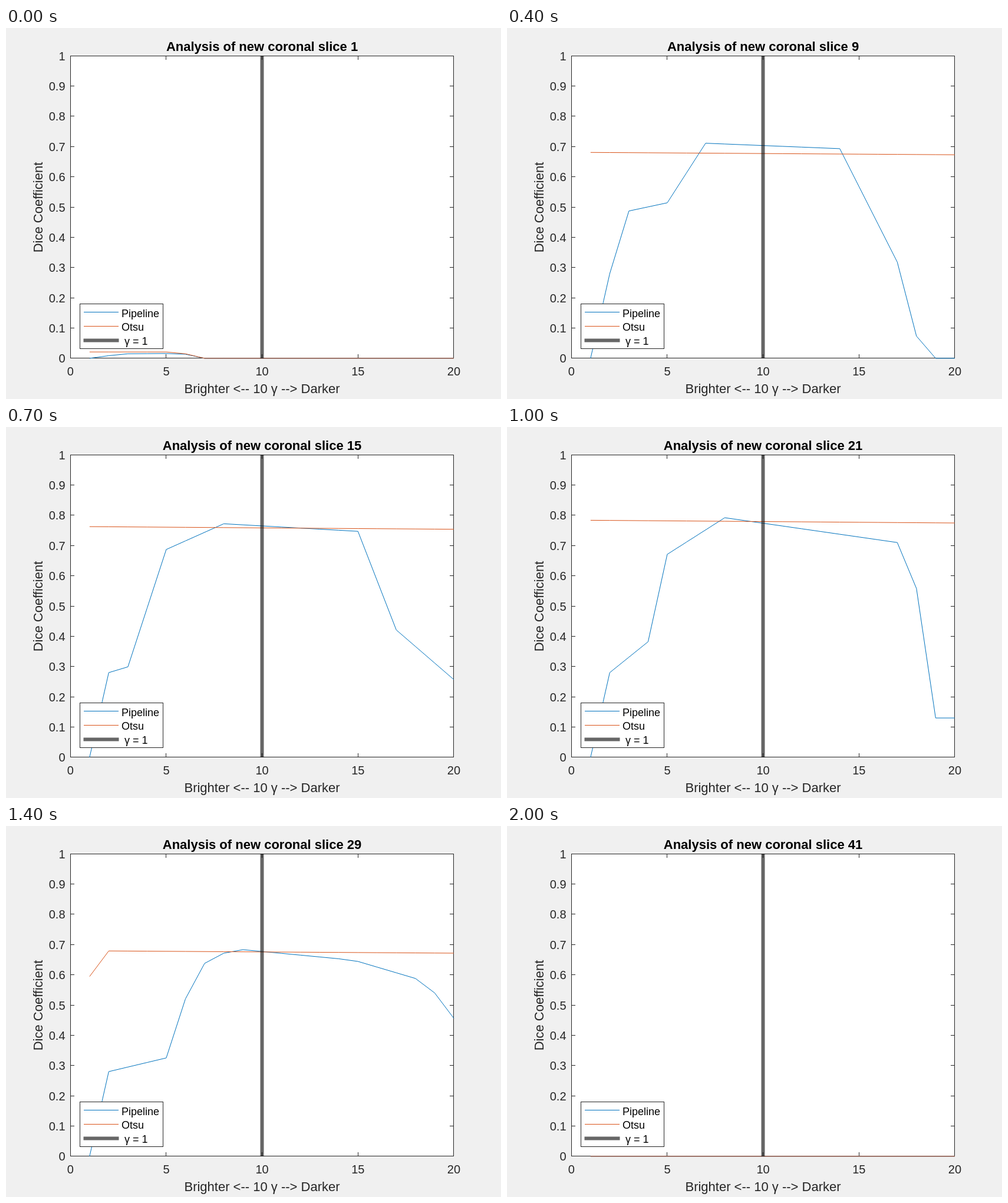
Animation, 840 px wide and 630 px high, one loop 2.05 s. Source, as an HTML page with a canvas:

```html
<!DOCTYPE html>
<html>
<head>
<meta charset="utf-8">
<style>
html, body { margin: 0; width: 100%; height: 100%; overflow: hidden; background: #f0f0f0; }
canvas { display: block; }
</style>
</head>
<body>
<canvas id="stage" width="840" height="630"></canvas>
<script>
const ctx = document.getElementById('stage').getContext('2d');
const STEP = 50, SLICES = 41;
const BLUE = '#0072bd', ORANGE = '#d95319', DARK = '#262626', GREY = '#666';
const FONT = '"Liberation Sans", Arial, sans-serif';
const px = v => 109.3 + v * 32.53;
const py = v => 560.9 - v * 513.7;
const pixel = v => Math.floor(v) + .5;
const mix = (a, b, u) => a + (b - a) * u;
const clamp = (v, lo, hi) => Math.min(hi, Math.max(lo, v));

// Otsu score by slice
const LEVELS = [[1, .021], [9, .681], [15, .763], [21, .784], [25, .758], [34, .49], [41, 0]];

// Pipeline turning points by slice: foot, knee, peak, shoulder, slope, tail
const SHAPES = [
  [9, [[3, .487], [5, .514], [7, .711], [14, .693], [17, .318], [18.3, 0]]],
  [15, [[3, .299], [5, .687], [8, .772], [15, .747], [17, .421], [20, .257]]],
  [21, [[4, .382], [5, .671], [8, .792], [17, .71], [18, .558], [19, .13]]],
  [25, [[4, .324], [5, .626], [8, .777], [17, .739], [19, .629], [20, .415]]],
  [34, [[7, .338], [8, .602], [9, .573], [12, .535], [18, .513], [20, .508]]]
];

// Smooth polynomial through the known levels
const level = slice => LEVELS.reduce((sum, [s, value]) =>
  sum + LEVELS.reduce((p, [t]) => t === s ? p : p * (slice - t) / (s - t), value), 0);

// The first slices lose their signal when darkened
const cutoff = (gamma, slice) => clamp((3 + 4 * slice - gamma) / 1.4, 0, 1);

function otsu(slice) {
  const top = level(slice), dip = Math.max(0, slice - 25) / 32;
  return g => top * (1 - .0006 * g) * (1 - dip * Math.max(0, 2 - g)) * cutoff(g, slice);
}

function pipeline(slice) {
  const s = clamp(slice, 9, 34);
  const i = Math.max(1, SHAPES.findIndex(([end]) => end >= s));
  const [from, start] = SHAPES[i - 1], [to, end] = SHAPES[i];
  const u = (s - from) / (to - from);
  const turns = start.map((p, j) => p.map((v, k) => mix(v, end[j][k], u)));
  const points = [[1, 0], [2, .28], ...turns];
  const scale = level(slice) / level(s);
  return g => along(points, g) * scale * cutoff(g, slice);
}

function along(points, x) {
  const i = points.findIndex(p => p[0] >= x);
  if (i < 0) return points[points.length - 1][1];
  if (i === 0) return points[0][1];
  const [x0, y0] = points[i - 1], [x1, y1] = points[i];
  return mix(y0, y1, (x - x0) / (x1 - x0));
}

function text(str, x, y, size, align = 'left', color = DARK, weight = '') {
  ctx.font = `${weight} ${size}px ${FONT}`;
  ctx.textAlign = align;
  ctx.fillStyle = color;
  ctx.fillText(str, x, y);
}

function line(points, color) {
  ctx.strokeStyle = color;
  ctx.beginPath();
  for (const [x, y] of points) ctx.lineTo(x, y);
  ctx.stroke();
}

function curve(score, color) {
  line(Array.from({ length: 20 }, (_, i) => [px(i + 1), py(score(i + 1))]), color);
}

function box(x, y, w, h) {
  ctx.fillStyle = '#fff';
  ctx.fillRect(x, y, w, h);
  ctx.strokeStyle = DARK;
  ctx.strokeRect(x + .5, y + .5, w - 1, h - 1);
}

function axes() {
  box(109, 47, 651, 514);
  for (let v = 0; v <= 20; v += 5) {
    const x = pixel(px(v));
    line([[x, 560], [x, 554]], DARK);
    line([[x, 48], [x, 54]], DARK);
    text(v, px(v), 590, 20, 'center');
  }
  for (let i = 0; i <= 10; i++) {
    const y = pixel(py(i / 10));
    line([[110, y], [116, y]], DARK);
    line([[759, y], [753, y]], DARK);
    text(i / 10, 100.5, Math.round(y + 7), 20, 'right');
  }
  text('Brighter <-- 10 γ --> Darker', 434.5, 620, 22, 'center');
  ctx.save();
  ctx.translate(62, 304.5);
  ctx.rotate(-Math.PI / 2);
  text('Dice Coefficient', 0, 0, 22, 'center');
  ctx.restore();
}

function legend() {
  box(125, 468, 142, 77);
  line([[132, 482.5], [191, 482.5]], BLUE);
  line([[132, 506.5], [191, 506.5]], ORANGE);
  ctx.fillStyle = GREY;
  ctx.fillRect(131.5, 527.5, 60, 6);
  text('Pipeline', 196, 491, 18, 'left', '#000');
  text('Otsu', 196, 514, 18, 'left', '#000');
  text('γ = 1', 201, 538, 18, 'left', '#000');
}

function draw() {
  const slice = Math.floor(performance.now() / STEP) % SLICES + 1;
  ctx.fillStyle = '#f0f0f0';
  ctx.fillRect(0, 0, 840, 630);
  axes();
  text('Analysis of new coronal slice ' + slice, 434.5, 39, 22, 'center', '#000', 'bold');
  curve(pipeline(slice), BLUE);
  curve(otsu(slice), ORANGE);
  ctx.fillStyle = 'rgba(0, 0, 0, .6)';
  ctx.fillRect(431.5, 47, 6, 514);
  legend();
  requestAnimationFrame(draw);
}
draw();
</script>
</body>
</html>
```
